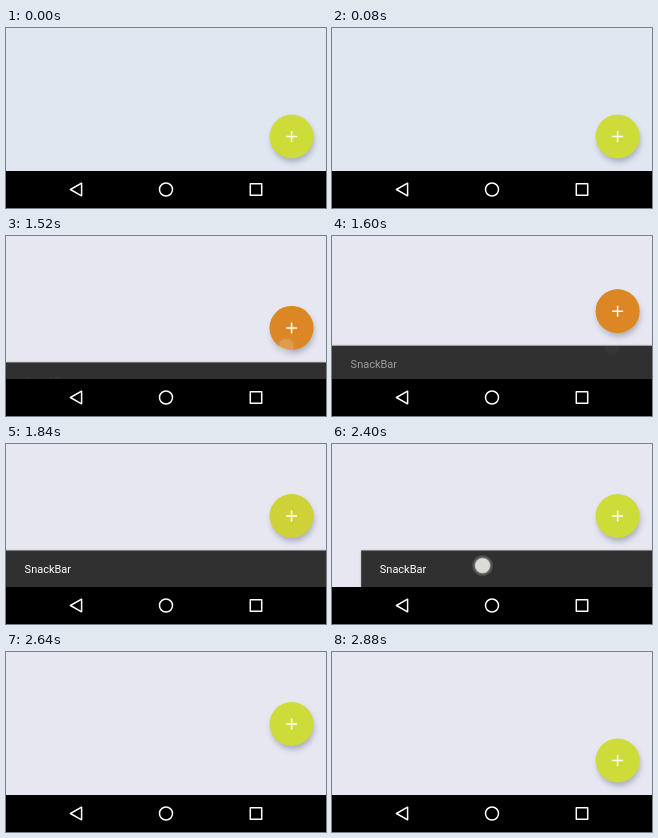
Recreate the animation shown at these times as an HTML page. Size 320x180 px, loop 2.96 s.

```html
<!DOCTYPE html>
<html lang="en">
<head>
<meta charset="utf-8">
<title>Snackbar and floating button</title>
<style>
  html, body { margin: 0; width: 100%; height: 100%; overflow: hidden; background: #000; }
  svg { display: block; width: 100%; height: 100%; }
  text { font: 11px Roboto, Arial, sans-serif; fill: #fff; }
</style>
</head>
<body>
<svg viewBox="0 0 320 180">
  <defs>
    <filter id="soft" x="-40%" y="-40%" width="180%" height="180%"><feGaussianBlur stdDeviation="3"/></filter>
    <filter id="edge" x="-5%" y="-20%" width="110%" height="140%"><feGaussianBlur stdDeviation="1"/></filter>
    <clipPath id="disc"><circle r="22"/></clipPath>
    <radialGradient id="glow">
      <stop offset=".6" stop-color="#dfe0ea" stop-opacity=".5"/>
      <stop offset="1" stop-color="#dfe0ea" stop-opacity="0"/>
    </radialGradient>
  </defs>
  <rect id="page" width="320" height="143"/>
  <g id="bar">
    <rect width="320" height="37" fill="#000" opacity=".25" filter="url(#edge)"/>
    <rect width="320" height="37" fill="#303030"/>
    <text id="label" x="18.6" y="22.7">SnackBar</text>
  </g>
  <g id="fab">
    <circle cx="1.2" cy="4" r="21" fill="#38406a" opacity=".38" filter="url(#soft)"/>
    <circle r="22" fill="#cddc39"/>
    <g clip-path="url(#disc)"><circle id="ripple" fill="#dd8626"/></g>
    <path d="M-5.5 0H5.5M0-5.5V5.5" stroke="#fff" stroke-width="1.5"/>
  </g>
  <g id="touch">
    <circle r="11" fill="url(#glow)"/>
    <circle r="7.7" fill="#f4f4ea" fill-opacity=".78" stroke="#77777c" stroke-opacity=".25"/>
  </g>
  <rect y="143" width="320" height="37"/>
  <g fill="none" stroke="#fff" stroke-width="1.5" stroke-linejoin="round">
    <path d="M64.4 161.5L75.6 155.2V167.8Z"/>
    <circle cx="160" cy="161.5" r="6.5"/>
    <rect x="244.3" y="155.8" width="11.4" height="11.4"/>
  </g>
</svg>
<script>
const LOOP = 2960, STEP = 80;
const TAP = 1200, SHOW = 1437, RELEASE = 1600, GRAB = 2080, SWIPE = 2323, HIDE = 2637;
const SLIDE = 250, TRAVEL = 36.5, WIDTH = 320;
const $ = id => document.getElementById(id);
const [page, bar, label, fab, ripple, touch] =
  ['page', 'bar', 'label', 'fab', 'ripple', 'touch'].map($);

const clamp = x => Math.min(1, Math.max(0, x));
const ramp = (t, start, duration) => clamp((t - start) / duration);

// cubic-bezier(.4, 0, .2, 1), solved by bisection
function ease(x) {
  if (x <= 0 || x >= 1) return x;
  let lo = 0, hi = 1, s;
  for (let i = 0; i < 20; i++) {
    s = (lo + hi) / 2;
    const u = 1 - s;
    if (1.2 * u * u * s + .6 * u * s * s + s ** 3 < x) lo = s; else hi = s;
  }
  return s * s * (3 - 2 * s);
}

const eased = (t, start, duration) => ease(ramp(t, start, duration));
const move = (el, x, y) => el.setAttribute('transform', `translate(${x} ${y})`);
const fade = (el, value) => el.setAttribute('opacity', value);

function drawBar(t, rise, swipe) {
  move(bar, swipe, 143 - TRAVEL * rise);
  // Fades between 10% and 70% of the swipe distance.
  fade(bar, rise > 0 ? 1 - clamp((swipe / WIDTH - .1) / .6) : 0);
  fade(label, eased(t, SHOW + 30, 370));
}

function drawButton(t, rise) {
  move(fab, 285.6, 108.5 - TRAVEL * (rise - eased(t, HIDE, SLIDE)));
  move(ripple, -6 * (1 - rise), 2 * (1 - rise));
  ripple.setAttribute('r', 32 * ramp(t, TAP, 240));
  fade(ripple, 1 - eased(t, RELEASE, 400));
}

function drawTouch(t, swipe) {
  if (t < GRAB) {
    move(touch, 280, 110.5);
    fade(touch, t < TAP ? 0 : 1 - eased(t, TAP + 160, 320));
  } else {
    move(touch, 115 + 1.22 * swipe, 120 + .054 * swipe);
    fade(touch, ramp(t, GRAB, 160) * (1 - ramp(t, SWIPE + 157, 160)));
  }
}

function draw(t) {
  const rise = eased(t, SHOW, SLIDE);
  const swipe = WIDTH * ramp(t, SWIPE, 255) ** 2;
  page.setAttribute('fill', t < 1360 ? '#e0e7f0' : '#e6e7f0');
  drawBar(t, rise, swipe);
  drawButton(t, rise);
  drawTouch(t, swipe);
}

const start = performance.now();
function tick() {
  const t = (performance.now() - start) % LOOP;
  draw(Math.floor(t / STEP) * STEP);
  requestAnimationFrame(tick);
}
tick();
</script>
</body>
</html>
```
